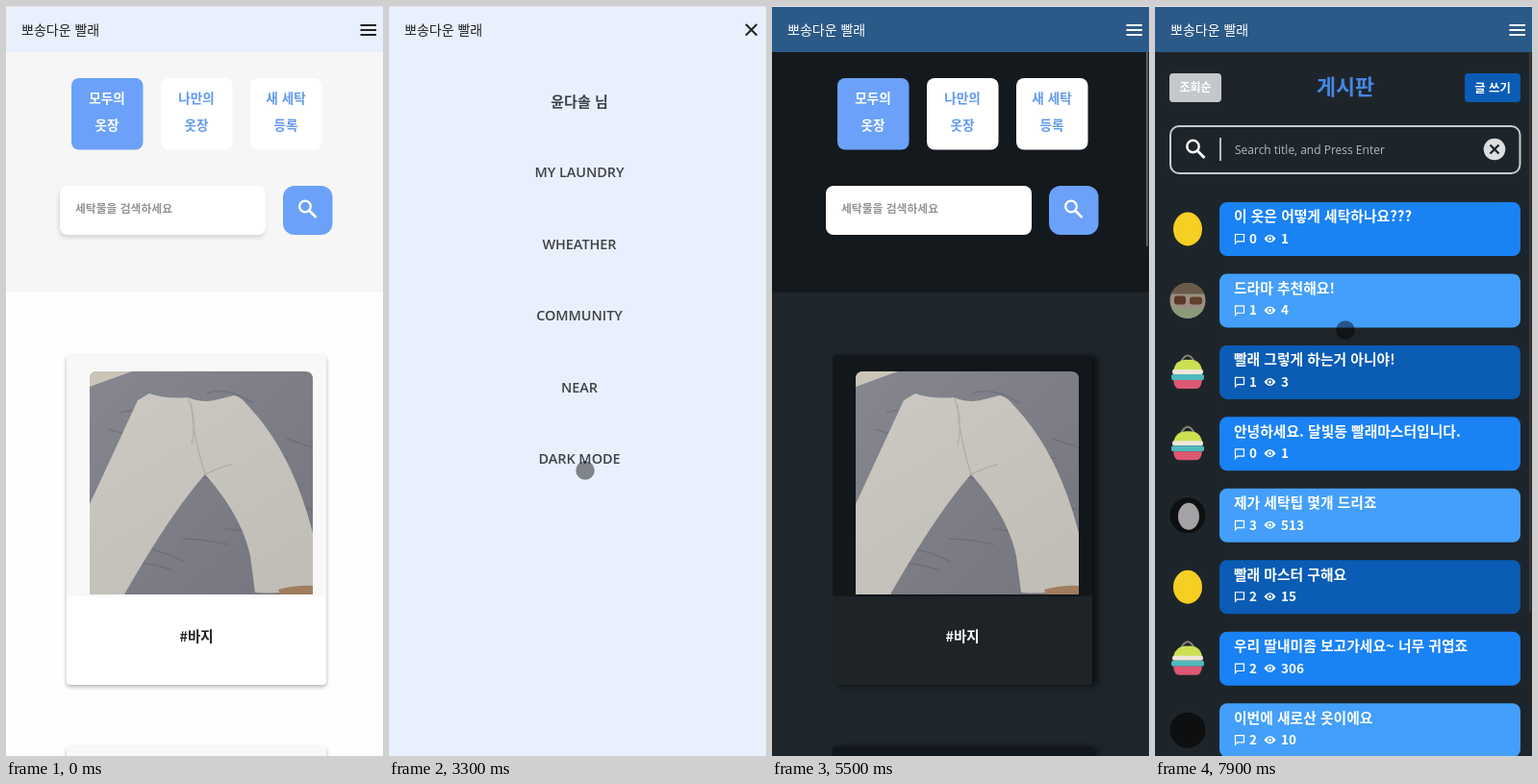
These frames come from a looping animation (392 by 780 pixels, 8000 ms). An HTML page:

```html
<!DOCTYPE html>
<html lang="ko">
<head>
<meta charset="utf-8">
<title>Laundry app</title>
<style>
html, body { margin: 0; width: 100%; height: 100%; overflow: hidden; background: #fff; }
svg { display: block; }
svg {
  --bar: #e8effd; --menu: #e9f0fd; --top: #f6f6f6; --page: #fefefe;
  --frame: #f8f8f8; --card: #fff; --ink: #222; --item: #3f4247; --shade: rgba(0,0,0,.3);
  font-family: "Noto Sans CJK KR", "Noto Sans CJK", sans-serif;
}
svg.dark {
  --bar: #2b5988; --menu: #295783; --top: #14191e; --page: #1e262b;
  --frame: #12171c; --card: #1d2327; --ink: #fff; --item: #f2f5f8; --shade: rgba(0,0,0,.6);
}
.latin { font-family: "Open Sans", "Noto Sans CJK KR", sans-serif; }
.card { filter: drop-shadow(0 2px 2px var(--shade)); }
.dark .card { filter: drop-shadow(5px 1px 3px var(--shade)); }
.field { filter: drop-shadow(-1px 3px 2px rgba(0,0,0,.13)); }
.dark .field { filter: none; }
</style>
</head>
<body>
<svg id="stage" width="392" height="780" viewBox="0 0 392 780">
  <defs>
    <clipPath id="photo"><path d="M0 232V8Q0 0 8 0H224Q232 0 232 8V232Z"/></clipPath>
    <clipPath id="disc"><circle r="18.5"/></clipPath>
    <linearGradient id="sheet" x2="1" y2="1"><stop stop-color="#85868e"/><stop offset="1" stop-color="#74757e"/></linearGradient>
    <linearGradient id="blanket" x2=".6" y2="1"><stop stop-color="#b2b1b5"/><stop offset="1" stop-color="#9b9ba1"/></linearGradient>
    <linearGradient id="cotton" x2=".7" y2="1"><stop stop-color="#cbc9c2"/><stop offset="1" stop-color="#c0beb6"/></linearGradient>
    <linearGradient id="brown" x2=".5" y2="1"><stop stop-color="#5b5651"/><stop offset="1" stop-color="#706a64"/></linearGradient>
    <linearGradient id="green" x2=".4" y2="1"><stop stop-color="#447a61"/><stop offset="1" stop-color="#366c53"/></linearGradient>
  </defs>
  <g id="home"></g>
  <g id="board"></g>
  <rect id="thumb" x="389" width="2" rx="1" fill="#5a6065"/>
  <g id="menu"></g>
  <g id="bar"></g>
  <circle id="dot" r="9.5" fill="#000" fill-opacity=".45" stroke="#000" stroke-opacity=".15"/>
</svg>
<script>
const $ = id => document.getElementById(id);

const rect = (x, y, w, h, fill, r = 0, more = '') =>
  `<rect x="${x}" y="${y}" width="${w}" height="${h}" rx="${r}" style="fill:${fill}" ${more}/>`;
const path = (d, fill, more = '') => `<path d="${d}" style="fill:${fill}" ${more}/>`;
const line = (d, color, width, more = '') =>
  `<path d="${d}" fill="none" style="stroke:${color}" stroke-width="${width}" ${more}/>`;
// y is the optical middle of the text
const text = (x, y, str, size, fill, weight = 700, anchor = 'middle', more = '') =>
  `<text x="${x}" y="${y + size * .37}" font-size="${size}" font-weight="${weight}" text-anchor="${anchor}" style="fill:${fill}" ${more}>${str}</text>`;
const lens = (x, y, r, reach, width) =>
  `<circle cx="${x}" cy="${y}" r="${r}" fill="none" stroke="#fff" stroke-width="${width}"/>` +
  line(`M${x + r * .7} ${y + r * .7}L${x + reach} ${y + reach}`, '#fff', width + .4);

// gentle cloth creases across a photo
const folds = (n, color, seed) => {
  let d = '';
  for (let i = 0; i < n; i++) {
    const a = (i * 83 + seed) % 230, b = (i * 47 + seed * 3) % 225;
    d += `M${a} ${b}q20 ${8 - i % 5 * 4} 48 ${6 + i % 3 * 4}`;
  }
  return line(d, color, 1.5, 'opacity=".3"');
};

const pants =
  rect(0, 0, 232, 232, 'url(#sheet)') + folds(18, '#50515d', 20) +
  path('M0 0H44L0 16Z', '#cbc5b8') +
  path('M62 23Q80 29 102 27Q118 34 134 29L150 25Q158 27 163 34Q210 82 232 168V226Q205 232 172 230L167 192Q158 150 120 107Q84 148 36 232H0V138Q26 82 50 30Z', 'url(#cotton)') +
  line('M102 27Q112 50 106 76M106 34Q107 65 120 107M120 107Q140 98 148 97', '#9f9b92', 1.5, 'opacity=".5"') +
  path('M196 227Q215 222 232 223V232H198Z', '#a17c5e');

const shirt =
  rect(0, 0, 232, 232, 'url(#blanket)') + folds(22, '#74757e', 11) +
  path('M0 0H215L113 24L28 43L33 82L0 108Z', '#d0cbc8') +
  path('M78 86L84 78Q110 82 134 79L144 90L185 86L232 98V124L208 133L203 160L232 208V232H14L33 160L0 157V127Z', 'url(#brown)') +
  line('M84 78Q92 98 107 104Q124 94 137 86M108 101Q112 150 130 232M118 101Q122 150 140 232', '#403c39', 1.4) +
  line('M138 133L178 129L183 171L160 178L137 172Z', '#8d867d', 1, 'stroke-dasharray="3 1"') +
  [[111, 103], [110, 127], [111, 152], [111, 178]].map(p => `<circle cx="${p[0]}" cy="${p[1]}" r="2.2" fill="#cfcac4"/>`).join('');

const sweater =
  rect(0, 0, 232, 232, 'url(#blanket)') + folds(22, '#787982', 37) +
  path('M0 0H115L40 10L0 26Z', '#cbc5c1') +
  path('M43 64Q56 60 68 62Q98 80 126 57L178 71Q198 82 201 104Q206 132 200 156L216 198V226L200 232H16L17 196L27 148L10 104Q18 74 43 64Z', 'url(#green)') +
  line('M27 148Q50 175 60 228M166 90Q190 140 160 205M68 62Q98 87 126 57M115 200Q145 170 172 160M95 226Q120 180 150 190', '#24523c', 2, 'opacity=".5"') +
  text(108, 109, 'K.VELDANORTH.', 13.2, '#eef1ec', 900, 'middle', 'font-family="Noto Serif, serif" stroke="#eef1ec" stroke-width=".5" transform="rotate(3 108 109)"');

const card = (y, photo, tag) =>
  `<g class="card">${rect(63, y, 270, 343, 'var(--card)', 4)}</g>` +
  rect(63, y, 270, 251, 'var(--frame)', 4) +
  `<g transform="translate(87 ${y + 17})" clip-path="url(#photo)">${photo}</g>` +
  text(198, y + 293, tag, 14.5, 'var(--ink)');

const tab = (x, top, low, on) =>
  rect(x, 75, 74.5, 74.5, on ? '#6ba1f9' : '#fff', 8) +
  text(x + 37, 96, top, 13.6, on ? '#fff' : '#6199ee') +
  text(x + 37, 124, low, 13.6, on ? '#fff' : '#6199ee');

const PITCH = 407;
$('home').innerHTML =
  rect(0, 0, 392, 2500, 'var(--page)') + rect(0, 0, 392, 298, 'var(--top)') +
  tab(68, '모두의', '옷장', true) + tab(161, '나만의', '옷장') + tab(254, '새 세탁', '등록') +
  `<g class="field">${rect(56, 187, 214, 51, '#fff', 8)}</g>` +
  text(72, 210.5, '세탁물을 검색하세요', 11.8, '#949494', 700, 'start') +
  rect(288, 187, 51.5, 51, '#6ba1f9', 12) + lens(311, 208.5, 5.8, 11.5, 2.3) +
  [[pants, '#바지'], [shirt, '#상의'], [sweater, '#상의'], [pants, '#바지']]
    .map((c, i) => card(363 + i * PITCH, c[0], c[1])).join('');

const basket =
  line('M-7 -11Q0 -24 7 -11', '#8a8578', 2) +
  path('M-15 -2Q-12 -14 0 -13Q13 -14 15 -2Z', '#cddf52') +
  rect(-16, -3, 32, 5, '#efe6dc', 2) + rect(-17, 2, 34, 6, '#4fb9bd', 2) +
  path('M-15 8H15Q14 17 9 17H-9Q-14 17 -15 8Z', '#dd5872');
const chick = '<ellipse rx="15" ry="17.5" fill="#f5cf22"/>';
const meadow = `<g clip-path="url(#disc)">${rect(-19, -19, 38, 38, '#9a8f80') + rect(-19, -19, 38, 12, '#6c5a48') +
  rect(-14, -5, 12, 9, '#5b3a2a', 3) + rect(2, -4, 13, 8, '#633f2d', 3) + rect(-19, 8, 38, 11, '#8b9a78')}</g>`;
const night = '<circle r="18.5" fill="#0d0f11"/>';
const grey = night + '<ellipse cx="1" cy="1" rx="11" ry="14" fill="#a5a3a6"/>';

const posts = [
  [chick, '이 옷은 어떻게 세탁하나요???', 0, 1],
  [meadow, '드라마 추천해요!', 1, 4],
  [basket, '빨래 그렇게 하는거 아니야!', 1, 3],
  [basket, '안녕하세요. 달빛동 빨래마스터입니다.', 0, 1],
  [grey, '제가 세탁팁 몇개 드리죠', 3, 513],
  [chick, '빨래 마스터 구해요', 2, 15],
  [basket, '우리 딸내미좀 보고가세요~ 너무 귀엽죠', 2, 306],
  [night, '이번에 새로산 옷이에요', 2, 10]
];
const blues = ['#1982f5', '#439ffa', '#0a5cb5'];
const post = ([face, title, notes, views], i) => {
  const y = 204 + i * 74.45;
  return `<g transform="translate(34 ${y + 28})">${face}</g>` +
    rect(67, y, 313, 56, blues[i % 3], 8) +
    text(82, y + 15, title, 14.8, '#fff', 700, 'start') +
    line(`M83.5 ${y + 43}v-9.5h9v7.3h-7z`, '#fff', 1.2) +
    text(98, y + 38, notes, 13.5, '#fff', 700, 'start') +
    path(`M113.5 ${y + 38}q6 -8 12 0q-6 8 -12 0Z`, '#fff') +
    `<circle cx="119.5" cy="${y + 38}" r="2.1" fill="none" stroke="${blues[i % 3]}" stroke-width="1.2"/>` +
    text(131, y + 38, views, 13.5, '#fff', 700, 'start');
};
$('board').innerHTML =
  rect(0, 0, 392, 780, '#1e252a') +
  rect(15, 70, 54, 30, '#c5c8ca', 4) + text(42, 85, '조회순', 12, '#fff') +
  text(198, 84, '게시판', 21.8, '#4488e2') +
  rect(322, 70, 58, 30, '#0a5cb5', 4) + text(351, 85, '글 쓰기', 12.4, '#fff') +
  rect(16, 125, 363.5, 49, 'none', 9, 'stroke="#c9cccd" stroke-width="2"') +
  lens(39.5, 146, 6.2, 12, 2.4) + rect(67, 137, 2, 24, '#b9bcbe') +
  text(83, 150, 'Search title, and Press Enter', 12, '#b4b8ba', 400, 'start', 'class="latin"') +
  '<circle cx="353" cy="149" r="11.3" fill="#dcdedf"/>' + line('M348.5 144.5l9 9m0 -9l-9 9', '#1e252a', 2.4) +
  posts.map(post).join('');

$('menu').innerHTML = rect(0, 0, 392, 780, 'var(--menu)') +
  text(198, 99, '윤다솔 님', 15, 'var(--item)') +
  ['MY LAUNDRY', 'WHEATHER', 'COMMUNITY', 'NEAR', 'DARK MODE'].map((s, i) =>
    text(198, 173 + i * 74.5, s, 14.4, 'var(--item)', 600, 'middle', 'class="latin"')).join('');
const modeItem = $('menu').lastElementChild;

$('bar').innerHTML = rect(0, 0, 392, 48, 'var(--bar)') + rect(0, 0, 392, 1, '#e4e5e7') +
  text(16, 25, '뽀송다운 빨래', 14, 'var(--ink)', 500, 'start') +
  line('M368.5 20h16.5m-16.5 5h16.5m-16.5 5h16.5', 'var(--ink)', 2, 'id="burger"') +
  line('M371 19l11.5 11.5m0 -11.5l-11.5 11.5', 'var(--ink)', 2, 'id="cross"');

const LOOP = 8000, STEP = 100, SLIDE = 616;
const clamp = v => Math.max(0, Math.min(1, v));
const easeOut = p => 1 - (1 - p) ** 2;
const smooth = p => p * p * (3 - 2 * p);
const DARK_AT = 3500, BOARD_AT = 7500;

// [time, opening?]
const slides = [[2000, 1], [3500, 0], [6400, 1], [7280, 0]];
const scrolls = [[0, 0], [4100, 0], [4400, 658], [4750, 658], [5300, 0], [LOOP, 0]];
// [time, x, y]
const pointer = [
  [0, 420, 40], [1600, 420, 40], [1900, 376, 24], [2100, 376, 24], [2900, 210, 460], [3200, 204, 483],
  [3600, 204, 483], [4000, 217, 590], [4400, 219, 419], [4700, 219, 300], [5200, 215, 600],
  [5400, 420, 560], [6000, 420, 60], [6200, 376, 24], [6400, 376, 24], [6900, 242, 499],
  [7200, 198, 337], [LOOP, 198, 337]
];

function at(track, t) {
  let i = 1;
  while (i < track.length - 1 && t >= track[i][0]) i++;
  const a = track[i - 1], b = track[i], p = smooth(clamp((t - a[0]) / (b[0] - a[0])));
  return a.slice(1).map((v, k) => v + (b[k + 1] - v) * p);
}

function menuOpen(t) {
  const s = slides.filter(m => m[0] <= t).pop();
  if (!s) return [0, 0];
  const p = easeOut(clamp((t - s[0]) / SLIDE));
  return [s[1] ? p : 1 - p, s[1]];
}

const show = (node, on) => node.setAttribute('visibility', on ? 'visible' : 'hidden');

function draw(t) {
  const dark = t >= DARK_AT, board = t >= BOARD_AT;
  const [scroll] = at(scrolls, t), [open, wanted] = menuOpen(t), [x, y] = at(pointer, t);
  $('stage').classList.toggle('dark', dark);
  modeItem.textContent = dark ? 'LIGHT MODE' : 'DARK MODE';
  $('home').setAttribute('transform', `translate(0 ${-scroll})`);
  $('home').style.display = board ? 'none' : '';
  $('board').style.display = board ? '' : 'none';
  $('menu').setAttribute('transform', `translate(${392 * (1 - open)} 0)`);
  show($('burger'), !wanted);
  show($('cross'), wanted);
  $('thumb').setAttribute('y', scroll * 780 / 2434);
  $('thumb').setAttribute('height', board ? 630 : 250);
  $('thumb').setAttribute('opacity', board ? .35 : t >= 4000 ? clamp((6000 - t) / 400) : 0);
  $('dot').setAttribute('transform', `translate(${x} ${y})`);
}

const start = performance.now();
function tick() {
  const t = (performance.now() - start) % LOOP;
  draw(Math.floor(t / STEP) * STEP);
  requestAnimationFrame(tick);
}
tick();
</script>
</body>
</html>
```
